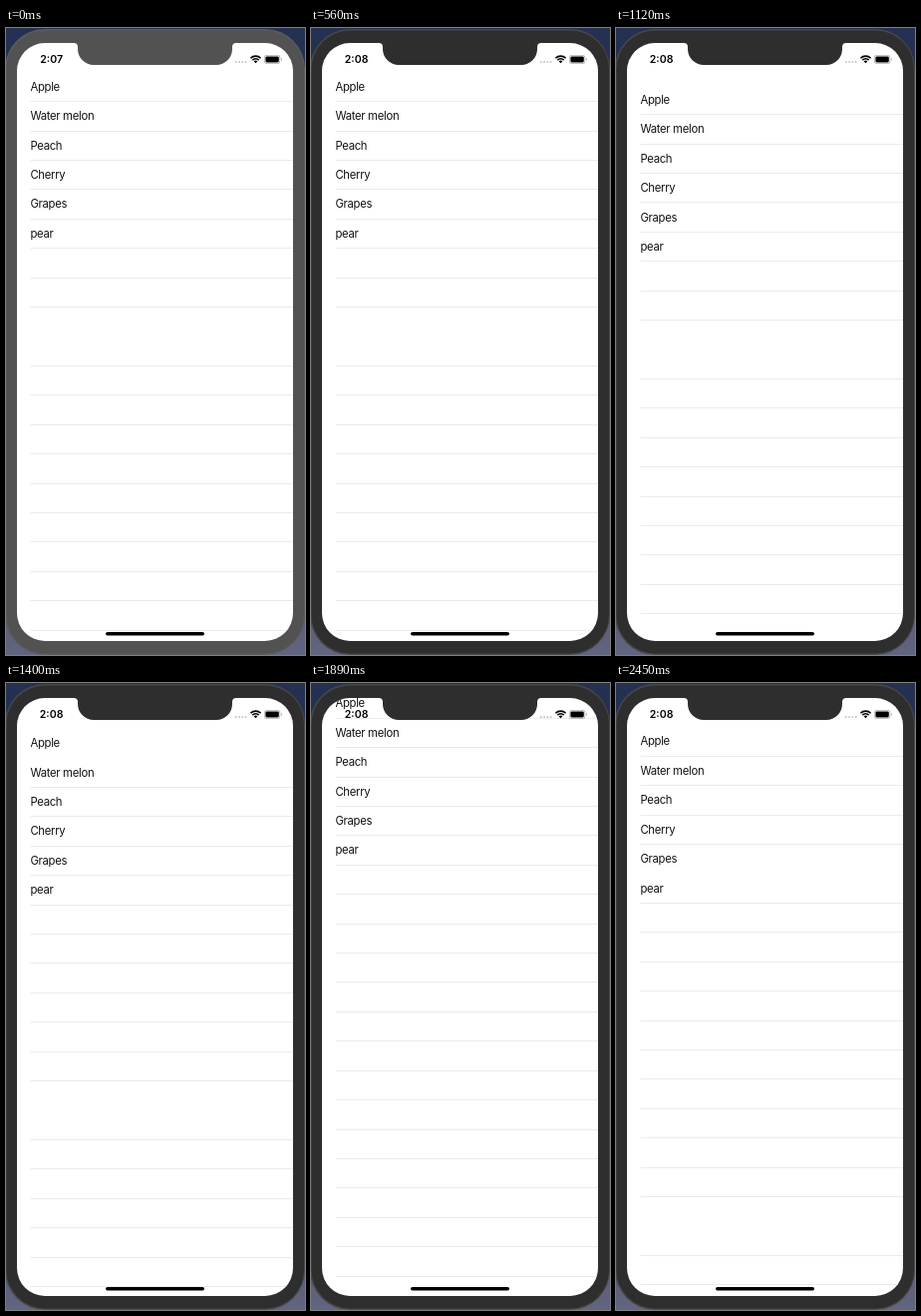
An HTML page with a canvas for the animation above (2520 ms loop, 300x628 px).

```html
<!DOCTYPE html>
<html lang="en">
<head>
<meta charset="utf-8">
<title>List bounce</title>
<style>
  html, body { margin: 0; width: 100%; height: 100%; overflow: hidden; background: #1f2a49; }
  canvas { display: block; width: 300px; height: 628px; }
</style>
</head>
<body>
<canvas id="stage"></canvas>
<script>
const WIDTH = 300, HEIGHT = 628;
const LOOP = 2520, STEP = 70;
const ROW = 353 / 12;          // 44 pt rows
const HALF_POINT = ROW / 88;   // scroll offsets snap to half points
const FIRST_LINE = 73.667;
const FRUITS = ['Apple', 'Water melon', 'Peach', 'Cherry', 'Grapes', 'pear'];

const canvas = document.getElementById('stage');
const ctx = canvas.getContext('2d');
const ratio = window.devicePixelRatio || 1;
canvas.width = WIDTH * ratio;
canvas.height = HEIGHT * ratio;
ctx.scale(ratio, ratio);

function roundRect(x, y, w, h, r, color) {
  ctx.beginPath();
  ctx.roundRect(x, y, w, h, r);
  ctx.fillStyle = color;
  ctx.fill();
}

// Eased drag to a peak, a short hold, then an exponential spring back.
function pull(t, { start, top, release, peak, decay }) {
  if (t <= start) return 0;
  if (t < top) return peak * (1 - Math.cos(Math.PI * (t - start) / (top - start))) / 2;
  return t < release ? peak : peak * Math.exp((release - t) / decay);
}

const DOWN = { start: 640, top: 840, release: 869.8, peak: 99.95, decay: 122.8 };
const UP = { start: 1620, top: 1890, release: 1890, peak: -38.44, decay: 118 };

function scrollOffset(t) {
  const offset = pull(t, t < UP.start ? DOWN : UP);
  return Math.round(offset / HALF_POINT) * HALF_POINT;
}

function drawDevice(active) {
  const desktop = ctx.createLinearGradient(0, 0, 0, HEIGHT);
  desktop.addColorStop(0, '#243152');
  desktop.addColorStop(0.5, '#20263c');
  desktop.addColorStop(1, '#62657f');
  ctx.fillStyle = desktop;
  ctx.fillRect(0, 0, WIDTH, HEIGHT);
  roundRect(-1, 1, 301, 627, 40, active ? '#48484a' : '#5c5c5e');
  roundRect(0.5, 2.5, 298.5, 624, 38.5, active ? '#2e2e2e' : '#525252');
}

function drawList(offset) {
  ctx.fillStyle = '#ebebec';
  for (let k = 0; k < 22; k++) {
    const y = FIRST_LINE + offset + k * ROW;
    // Hairlines that fall exactly between two pixel rows vanish.
    if ((y + 0.015) % 1 < 0.06) continue;
    ctx.fillRect(24.5, Math.floor(y), 264, 1);
  }
  ctx.fillStyle = '#111';
  ctx.font = '400 11.3px Inter, Roboto, sans-serif';
  ctx.letterSpacing = '-0.3px';
  ctx.textAlign = 'left';
  FRUITS.forEach((name, i) => ctx.fillText(name, 24.4, 62.8 + offset + i * ROW));
}

function drawNotch(color) {
  ctx.beginPath();
  ctx.moveTo(68, 14);
  ctx.lineTo(68, 15);
  ctx.quadraticCurveTo(72, 15, 72, 19);
  ctx.arcTo(72, 37, 88, 37, 16);
  ctx.arcTo(227, 37, 227, 20, 16);
  ctx.lineTo(227, 19);
  ctx.quadraticCurveTo(227, 15, 231, 15);
  ctx.lineTo(231, 14);
  ctx.fillStyle = color;
  ctx.fill();
}

function drawWifi(x, y) {
  ctx.strokeStyle = '#000';
  ctx.lineWidth = 1.6;
  for (const radius of [7.2, 4.5]) {
    ctx.beginPath();
    ctx.arc(x, y, radius, -Math.PI * 0.75, -Math.PI * 0.25);
    ctx.stroke();
  }
  ctx.beginPath();
  ctx.moveTo(x, y);
  ctx.arc(x, y, 2.6, -Math.PI * 0.75, -Math.PI * 0.25);
  ctx.fillStyle = '#000';
  ctx.fill();
}

function drawStatus(clock) {
  ctx.fillStyle = '#000';
  ctx.font = '600 10.6px Inter, Roboto, sans-serif';
  ctx.letterSpacing = '0px';
  ctx.textAlign = 'center';
  ctx.fillText(clock, 45.6, 35.4);
  for (let i = 0; i < 4; i++) roundRect(229.7 + i * 3.3, 33, 2, 2, 1, '#c4c4c4');
  drawWifi(250.5, 35.3);
  roundRect(259, 27, 16.2, 8.8, 2.6, '#b0b0b0');
  roundRect(259.7, 27.7, 14.8, 7.4, 2, '#fff');
  roundRect(260.4, 28.4, 13.4, 6, 1.4, '#000');
  roundRect(275.8, 30, 1, 2.8, 0.6, '#b0b0b0');
}

function draw(time) {
  const t = Math.floor((time % LOOP) / STEP) * STEP;
  const active = t >= 560;
  drawDevice(active);
  ctx.save();
  roundRect(11, 15, 277, 599, 28, '#fff');
  ctx.clip();
  drawList(scrollOffset(t));
  drawStatus(t < 280 ? '2:07' : '2:08');
  roundRect(100, 605, 99, 3.6, 1.8, '#000');
  ctx.restore();
  drawNotch(active ? '#2e2e2e' : '#525252');
}

const begin = performance.now();
function tick(now) {
  draw(Math.max(0, now - begin));
  requestAnimationFrame(tick);
}
draw(0);
requestAnimationFrame(tick);
</script>
</body>
</html>
```
